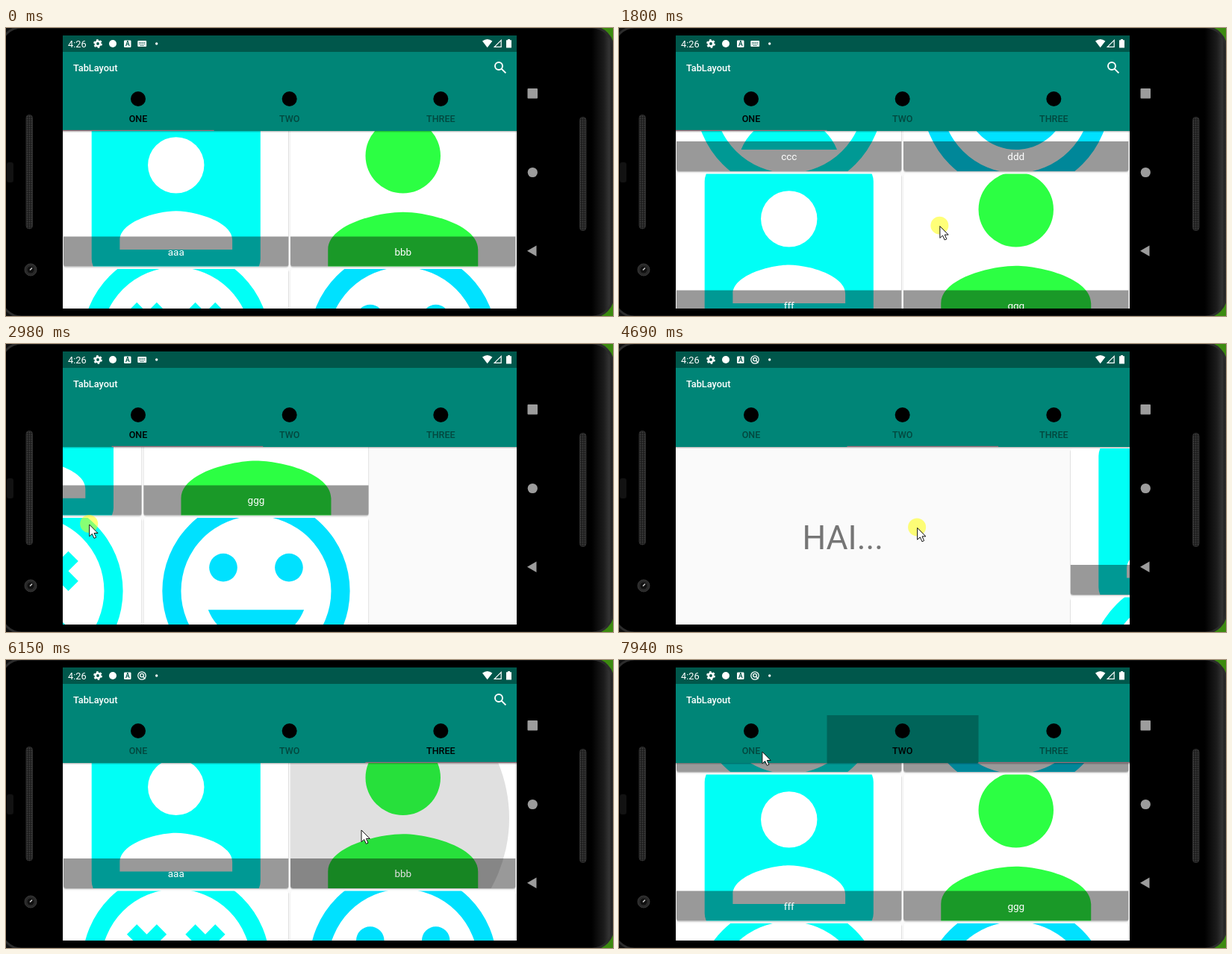
Animation of 813x386 px, one loop 8000 ms. Source, as an HTML page:

```html
<!DOCTYPE html>
<html lang="en">
<head>
<meta charset="utf-8">
<title>TabLayout</title>
<style>
html, body { margin: 0; width: 100%; height: 100%; overflow: hidden; background: #000; }
svg { display: block; }
text { font-family: Roboto, Arial, sans-serif; }
.tab { font-size: 12.5px; font-weight: 500; text-anchor: middle; }
.cap { font-size: 13.5px; text-anchor: middle; fill: #fff; }
</style>
</head>
<body>
<svg id="stage" width="813" height="386" viewBox="0 0 813 386">
  <defs>
    <clipPath id="view"><rect x="76" y="138" width="608" height="238"/></clipPath>
    <clipPath id="card"><rect width="301.5" height="196" rx="3.5"/></clipPath>
    <clipPath id="tabClip"><rect x="278.5" y="74" width="203" height="64"/></clipPath>
    <pattern id="mesh" width="3" height="3" patternUnits="userSpaceOnUse">
      <rect width="3" height="3" fill="#1c1c1c"/><circle cx="1.5" cy="1.5" r=".9" fill="#414141"/>
    </pattern>
    <linearGradient id="shade" x2="0" y2="1">
      <stop stop-opacity=".28"/><stop offset="1" stop-opacity="0"/>
    </linearGradient>
    <linearGradient id="rim">
      <stop offset=".965" stop-color="#000"/><stop offset=".985" stop-color="#1c1c1c"/>
      <stop offset=".994" stop-color="#343434"/><stop offset="1" stop-color="#161616"/>
    </linearGradient>
  </defs>

  <!-- phone body -->
  <rect width="813" height="386" fill="#111"/>
  <path d="M790 0h23v386h-23z" fill="#3c8a10"/>
  <rect x="-7" y="-1" width="820" height="388" rx="28" fill="url(#rim)" stroke="#2c2c2c" stroke-width="3"/>
  <g fill="url(#mesh)" stroke="#2d2d2d">
    <rect x="27" y="116.5" width="8.5" height="152.5" rx="4"/>
    <rect x="768.5" y="119.5" width="8.5" height="152" rx="4"/>
  </g>
  <rect x="1" y="180" width="9" height="27" rx="3" fill="#121212"/>
  <circle cx="33" cy="324" r="8" fill="#292929" stroke="#383838"/>
  <circle cx="33" cy="324" r="4.5" fill="#101010"/>
  <path d="M32 324.500l3-3" stroke="#ccc" stroke-width="1.6"/>
  <g fill="#9c9c9c">
    <rect x="698.5" y="81" width="13.5" height="13.5" rx="1"/>
    <circle cx="705.3" cy="193.5" r="6.6"/>
    <path d="M698 298.800l12.500-7.300v14.600z"/>
  </g>

  <!-- pages -->
  <rect x="76" y="138" width="608" height="238" fill="#fafafa"/>
  <g clip-path="url(#view)">
    <g id="page0"><g class="list"></g></g>
    <g id="page1"><text x="380" y="275" font-size="44.5" fill="#757575" text-anchor="middle">HAI...</text></g>
    <g id="page2"><g class="list"></g></g>
  </g>
  <rect x="76" y="138" width="608" height="2.5" fill="url(#shade)"/>

  <!-- header -->
  <rect x="76" y="10" width="608" height="22" fill="#00574b"/>
  <rect x="76" y="32" width="608" height="106" fill="#008577"/>
  <g clip-path="url(#tabClip)"><circle id="tabRipple" cx="400" cy="118" r="0" opacity=".25"/></g>
  <rect id="bar" x="76" y="136.8" width="202.67" height="1.2" fill="#a06a78"/>
  <text x="83" y="25.8" font-size="12.8" fill="#fff">4:26</text>
  <text x="90" y="58" font-size="12.8" font-weight="500" fill="#fff">TabLayout</text>
  <g id="tabs"></g>

  <!-- status icons -->
  <g fill="#fff">
    <circle cx="123" cy="21" r="3.2" fill="none" stroke="#fff" stroke-width="2.6"/>
    <circle cx="123" cy="21" r="5" fill="none" stroke="#fff" stroke-width="1.8" stroke-dasharray="2.618"/>
    <circle cx="143" cy="21" r="5"/>
    <rect x="158" y="16.5" width="9.5" height="9.5" rx="1.2"/>
    <text x="162.75" y="24.3" font-size="8.5" font-weight="700" text-anchor="middle" fill="#00574b">A</text>
    <g id="keys">
      <rect x="176.3" y="17" width="11.8" height="8" rx="1"/>
      <path d="M178 19.300h8.500M178 21.300h8.500M179.500 23.500h5.500" stroke="#00574b" stroke-dasharray="1.2 .6"/>
    </g>
    <g id="swirl" fill="none" stroke="#fff" stroke-width="1.3">
      <circle cx="182" cy="21" r="5.2"/>
      <circle cx="182" cy="20.6" r="2.3"/>
      <path d="M183.500 22.200l3 3.200"/>
    </g>
    <circle cx="201.7" cy="21" r="1.7"/>
    <path d="M638 17.500q6.700-5 13.400 0l-6.700 8.700z"/>
    <path d="M654.200 25.400h9v-9z" fill="none" stroke="#fff" stroke-width="1.2"/>
    <path d="M670 16.300h2v-1.300h3v1.300h2v10.200h-7z"/>
    <g id="search" fill="none" stroke="#fff" stroke-width="1.9">
      <circle cx="660" cy="51" r="5"/><path d="M663.600 54.600l5.800 5.800"/>
    </g>
  </g>

  <g id="cursor">
    <circle id="press" r="12" cx=".5" fill="#ff0" opacity=".53"/>
    <path d="M1 1v15.800l3.700-3.300 2.600 5.900 2.700-1.200-2.600-5.700h4.900z" fill="#fff" stroke="#111" stroke-linejoin="round"/>
  </g>
</svg>

<script>
const $ = id => document.getElementById(id);
const LOOP = 8000, START = 570, STEP = 77.5, WIDTH = 608, TAB = WIDTH / 3;

// Icons on a 24-unit grid
const dot = (x, y, r) => `M${x - r} ${y}a${r} ${r} 0 1 0 ${2 * r} 0a${r} ${r} 0 1 0 ${-2 * r} 0z`;
const ring = dot(12, 12, 10) + dot(12, 12, 8);
const cross = x => `M${x - 2.12} 8.82l1.06-1.06 1.06 1.06 1.06-1.06 1.06 1.06-1.06 1.06 1.06 1.06-1.06 1.06`
  + '-1.06-1.06-1.06 1.06-1.06-1.06 1.06-1.06z';
const mouth = (y, d) => `M6.89 ${y}c.8 ${2.04 * d} 2.78 ${3.5 * d} 5.11 ${3.5 * d}s4.31 ${-1.46 * d} 5.11 ${-3.5 * d}z`;
const ICONS = [
  ['#00fff6', 'M5 3h14a2 2 0 0 1 2 2v14a2 2 0 0 1-2 2H5a2 2 0 0 1-2-2V5a2 2 0 0 1 2-2z' + dot(12, 9, 3)
    + 'M6 17c0-2 4-3.1 6-3.1s6 1.1 6 3.1v1H6z'],
  ['#2cff43', dot(12, 8, 4) + 'M12 14c-2.67 0-8 1.34-8 4v2h16v-2c0-2.66-5.33-4-8-4z'],
  ['#00fff6', ring + cross(8.88) + cross(15.12) + mouth(17.5, -1)],
  ['#00e1ff', ring + dot(8.5, 9.5, 1.5) + dot(15.5, 9.5, 1.5) + mouth(14, 1)]
];

const card = (name, i) => {
  const [color, path] = ICONS[i % 4];
  const x = i % 2 ? 381 : 77, y = 140 + 199.6 * (i >> 1);
  return `<g transform="translate(${x} ${y})">
    <rect x="-.5" y=".5" width="302.5" height="197.5" rx="4" opacity=".07"/>
    <rect y="1" width="301.5" height="196" rx="3.5" opacity=".16"/>
    <g clip-path="url(#card)">
      <rect width="301.5" height="196" fill="#fff"/>
      <path transform="translate(0 -52.75) scale(12.5625)" fill="${color}" fill-rule="evenodd" d="${path}"/>
      <rect y="156" width="301.5" height="40" opacity=".4"/>
      <text class="cap" x="150.75" y="181">${name}</text>
      <circle class="ripple" cx="99" cy="102" r="0"/>
    </g></g>`;
};
const lists = [...document.querySelectorAll('.list')];
lists.forEach(l => l.innerHTML = [...'abcdfghi'].map(c => c.repeat(3)).map(card).join(''));
const ripple = lists[1].querySelectorAll('.ripple')[1];

$('tabs').innerHTML = ['ONE', 'TWO', 'THREE'].map((s, i) => {
  const x = 177 + TAB * i;
  return `<circle cx="${x}" cy="95" r="10"/><text class="tab" x="${x}" y="125.6">${s}</text>`;
}).join('');
const labels = [...document.querySelectorAll('.tab')];

// Pointer gestures: pressed from one moment and place to another
const GESTURES = [
  { t: [570, 1035], from: [432, 352], to: [430, 195] },
  { t: [1500, 2040], from: [430, 345], to: [428, 205] },
  { t: [2817, 3127], from: [206, 240], to: [16, 242] },
  { t: [4520, 5087], from: [530, 239], to: [57, 262] },
  { t: [5690, 6020], from: [480, 242], to: [479, 212] },
  { t: [6400, 7080], from: [445, 340], to: [400, 130] },
  { t: [7400, 7700], from: [400, 124], to: [400, 124] },
  { t: [7933, 7933], from: [190, 122], to: [190, 122] }
];

const clamp = (v, lo, hi) => Math.min(hi, Math.max(lo, v));
const part = (t, a, b) => clamp((t - a) / (b - a), 0, 1);
const glide = (t, start, time, dist) => {
  const f = part(t, start, start + time);
  return dist * f * f * (3 - 2 * f);
};
const mix = (a, b, f) => a.map((v, i) => v + (b[i] - v) * f);

const pageAt = t => glide(t, 2760, 559, 1) + glide(t, 4520, 691, 1);
const scrollAt = [
  t => 16.5 + glide(t, 570, 850, 257) + glide(t, 1500, 850, 232.3),
  t => glide(t, 5690, 460, 30) + glide(t, 6400, 1013, 355.7)
];

function pointerAt(t) {
  const i = GESTURES.findIndex(g => t < g.t[1]);
  const g = GESTURES[i] || GESTURES[GESTURES.length - 1];
  if (t >= g.t[0]) return mix(g.from, g.to, part(t, ...g.t));
  const last = GESTURES[i - 1] || g;
  return mix(last.to, g.from, part(t, last.t[1], g.t[0]) ** 2);
}

const move = (el, x, y) => el.setAttribute('transform', `translate(${x.toFixed(2)} ${y.toFixed(2)})`);
const show = (el, on) => el.setAttribute('visibility', on ? 'visible' : 'hidden');

function draw(time) {
  const n = Math.floor((time - START + 12) / STEP);
  const t = n < 0 ? 0 : START + n * STEP;
  const clicked = t > 7770;

  const p = pageAt(t);
  for (let i = 0; i < 3; i++) move($('page' + i), (i - p) * WIDTH, 0);
  lists.forEach((l, i) => move(l, 0, -scrollAt[i](t)));
  move($('bar'), p * TAB, 0);

  ripple.setAttribute('r', Math.max(0, (t - 5950) * .97));
  ripple.setAttribute('opacity', .12 * (1 - part(t, 6150, 6400)));
  $('tabRipple').setAttribute('r', 140 * part(t, 7400, 7620));

  // a swipe leaves the middle label dim; a click lights it
  const lit = clicked ? 1 : p < .5 ? 0 : p > 1.5 ? 2 : -1;
  labels.forEach((l, i) => l.setAttribute('fill', i === lit ? '#000' : '#03483f'));
  show($('search'), !clicked && Math.abs(p - 1) > .9);
  show($('keys'), t < 3590);
  show($('swirl'), t >= 3590);

  move($('cursor'), ...pointerAt(t));
  show($('cursor'), t >= START);
  show($('press'), GESTURES.some(g => t >= g.t[0] && t < g.t[1]));
}

// search hides only once the swipe is nearly done, so keep it by time of settling
const t0 = performance.now();
function frame() {
  draw((performance.now() - t0) % LOOP);
  requestAnimationFrame(frame);
}
draw(0);
requestAnimationFrame(frame);
</script>
</body>
</html>
```
